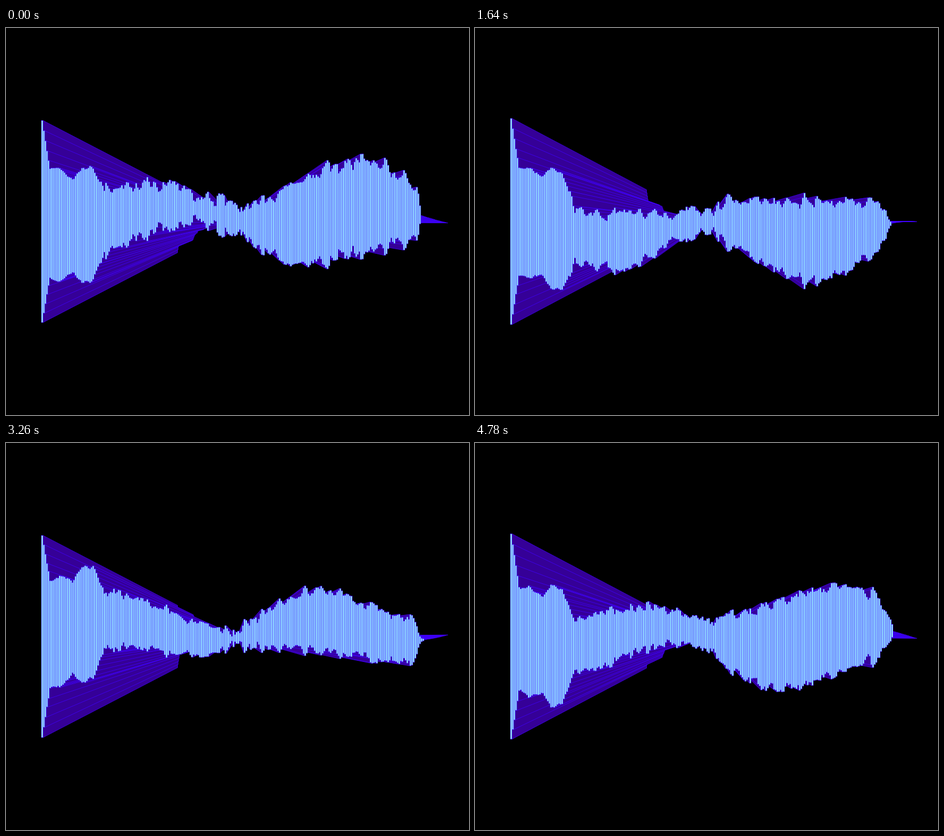
Write an HTML page with a canvas that moves like this. It is 819 by 684 pixels and loops after 4800 ms.

```html
<!DOCTYPE html>
<html lang="en">
<head>
<meta charset="utf-8">
<title>Spectrum</title>
<style>
html, body { margin: 0; height: 100%; overflow: hidden; background: #000; }
canvas { display: block; }
</style>
</head>
<body>
<canvas id="stage" width="819" height="684"></canvas>
<script>
const ctx = document.getElementById('stage').getContext('2d');
const LOOP = 4800, STEP = 20;
const BARS = 256, LEFT = 62.6, PITCH = 2.82;
const CX = 409.5, CY = 342, BACK = 0.308;

// Average spectrum: [bar index, height]
const envelope = [
  [5, 185], [11, 194], [19, 168], [25, 212], [32, 200], [39, 100], [56, 100], [85, 75],
  [102, 56], [126, 36], [138, 82], [155, 112], [180, 138], [201, 132], [231, 92], [237, 32], [240, 0],
];
// Beats of the first bar: [time, extra height]
const beats = [[270, 120], [2440, 78], [3050, 80], [3640, -75]];

const mix = (a, b, k) => a + (b - a) * k;

function hash(a, b) {
  const s = Math.sin(a * 127.1 + b * 311.7) * 43758.5453;
  return (s - Math.floor(s)) * 2 - 1;
}

function noise(x, y) {
  const a = Math.floor(x), b = Math.floor(y), u = x - a, v = y - b;
  return mix(mix(hash(a, b), hash(a + 1, b), u),
             mix(hash(a, b + 1), hash(a + 1, b + 1), u), v);
}

function firstBar(t) {
  const pulse = ([time, extra]) => extra * Math.exp(-(((t - time) / 110) ** 2));
  return beats.reduce((h, beat) => h + pulse(beat), 360 + 14 * noise(7, t / 120));
}

function average(i, first) {
  let [x0, h0] = [0, first];
  for (const [x1, h1] of envelope) {
    if (i <= x1) return mix(h0, h1, (i - x0) / (x1 - x0));
    [x0, h0] = [x1, h1];
  }
  return 0;
}

function barHeight(i, t, first) {
  let h = average(i, first);
  if (i < 4 || h === 0) return h;
  if (i > 110) h *= 1 + 0.22 * Math.cos((t + 200) / 2400 * 2 * Math.PI);
  const rough = i < 37 ? 9 : 24;
  h += rough * (noise(i * 0.37, t / 110) + 0.8 * noise(i * 0.8 + 500, t / 80));
  return Math.max(0, h);
}

function barsAt(t) {
  const phase = 0.6 + t * 0.0025, first = firstBar(t);
  return Array.from({ length: BARS }, (_, i) => {
    const h = barHeight(i, t, first);
    const mid = CY + 17.5 * (Math.sin(i * 0.05 + phase) - Math.sin(phase));
    return { x: LEFT + i * PITCH, h, top: mid - h / 2, bottom: mid + h / 2 };
  });
}

const toBack = (x, y) => [mix(CX, x, BACK), mix(CY, y, BACK)];

function drawSide({ x, top, bottom }) {
  const edge = x < CX ? x + PITCH : x;
  ctx.beginPath();
  ctx.moveTo(edge, top);
  ctx.lineTo(...toBack(edge, top));
  ctx.lineTo(...toBack(edge, bottom));
  ctx.lineTo(edge, bottom);
  ctx.closePath();
  ctx.fill();
  ctx.stroke();
}

function draw(t) {
  const bars = barsAt(t);
  ctx.fillStyle = '#000';
  ctx.fillRect(0, 0, 819, 684);

  ctx.lineWidth = 1;
  ctx.fillStyle = '#350097';
  ctx.strokeStyle = 'rgba(64, 0, 255, 0.75)';
  for (let i = 0; i < BARS / 2; i++) {
    drawSide(bars[i]);
    drawSide(bars[BARS - 1 - i]);
  }

  ctx.lineWidth = 0.65;
  ctx.fillStyle = '#99f4ff';
  ctx.strokeStyle = '#4000ff';
  for (const { x, h, top } of bars) {
    if (h < 2) continue;
    ctx.fillRect(x, top, PITCH, h);
    ctx.strokeRect(x, top, PITCH, h);
  }
}

function tick() {
  const t = performance.now() % LOOP;
  draw(Math.floor(t / STEP) * STEP);
  requestAnimationFrame(tick);
}
tick();
</script>
</body>
</html>
```
